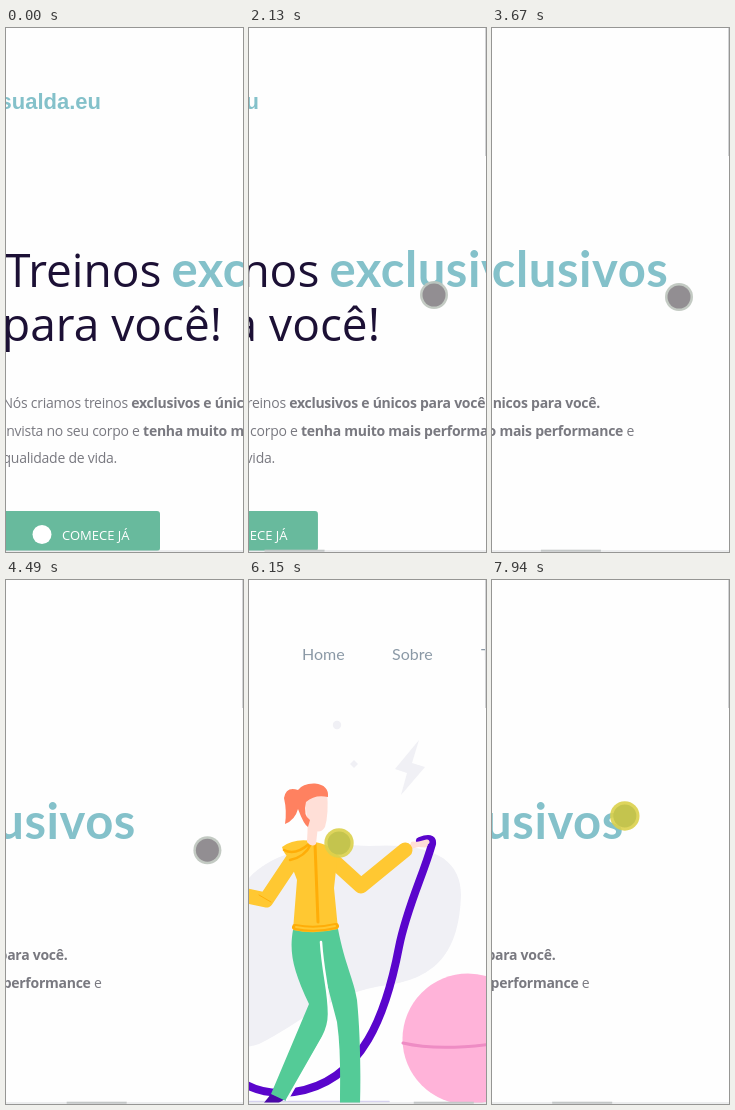
An HTML page with a canvas that plays this animation: 237x524 px, repeating every 8000 ms.

```html
<!DOCTYPE html>
<html lang="pt">
<head>
<meta charset="utf-8">
<title>Treinos</title>
<style>
html, body { margin: 0; width: 100%; height: 100%; overflow: hidden; background: #fefefe; }
canvas { display: block; width: 237px; height: 524px; }
</style>
</head>
<body>
<canvas id="stage"></canvas>
<script>
const W = 237, H = 524, LOOP = 8000, ART_X = 675;
const canvas = document.getElementById('stage');
const ctx = canvas.getContext('2d');
const dpr = window.devicePixelRatio || 1;
canvas.width = Math.round(W * dpr);
canvas.height = Math.round(H * dpr);

// [time, scroll]
const SCROLL = [[0, 0], [1160, 0], [2130, 85], [2800, 130], [3600, 217], [4240, 217],
  [4850, 330], [5450, 468], [5850, 600], [6150, 675], [6300, 675], [7050, 567],
  [7500, 490], [7940, 262], [8000, 240]];
// [time, x, y]
const POINTER = [[1160, 255, 285], [1450, 185, 267], [2130, 185, 267], [3670, 187, 269],
  [4240, 187, 269], [4850, 222, 272], [5450, 195, 271], [5900, 98, 264], [6150, 90, 263],
  [6300, 92, 263], [7050, 249, 262], [7350, 268, 255], [7600, 210, 246], [7940, 133, 236], [8000, 122, 234]];

function at(keys, t, col = 1) {
  let i = 1;
  while (i < keys.length - 1 && keys[i][0] < t) i++;
  const a = keys[i - 1], b = keys[i];
  const k = Math.min(1, Math.max(0, (t - a[0]) / (b[0] - a[0])));
  return a[col] + (b[col] - a[col]) * k;
}

function fill(d, color) {
  ctx.fillStyle = color;
  ctx.fill(new Path2D(d));
}

function line(d, color, width) {
  ctx.strokeStyle = color;
  ctx.lineWidth = width;
  ctx.lineCap = ctx.lineJoin = 'round';
  ctx.stroke(new Path2D(d));
}

function disc(x, y, r, color) {
  ctx.fillStyle = color;
  ctx.beginPath();
  ctx.arc(x, y, r, 0, Math.PI * 2);
  ctx.fill();
}

function text(str, x, y, font, color, spacing = 0, align = 'left') {
  ctx.font = font;
  ctx.letterSpacing = spacing + 'px';
  ctx.fillStyle = color;
  ctx.textAlign = align;
  ctx.fillText(str, x, y);
  return x + ctx.measureText(str).width;
}

const lato = (weight, size) => `${weight} ${size}px Lato, sans-serif`;
const open = (weight, size) => `${weight} ${size}px "Open Sans", sans-serif`;

function drawCopy() {
  const dark = '#1c1035', teal = '#84c1ca', gray = '#797980';
  text('sualda.eu', 95, 81, 'bold 22px "Liberation Sans", Arial, sans-serif', teal, 0, 'right');

  const title = open(400, 46);
  text('Treinos', -1, 259, title, dark);
  text('exclusivos', 165.5, 259, lato(700, 49), teal, 0.55);
  text('para você!', -4, 313, title, dark);

  const body = open(400, 14), strong = open(700, 14), tight = -0.26;
  let x = text('Nós criamos treinos ', -3.5, 380, body, gray, tight);
  text('exclusivos e únicos para você.', x, 380, strong, gray, tight);
  x = text('Invista no seu corpo e ', -3.5, 408, body, gray, tight);
  x = text('tenha muito mais performance', x, 408, strong, gray, tight);
  text(' e', x, 408, body, gray, tight);
  text('qualidade de vida.', -3.5, 435, body, gray, tight);

  ctx.fillStyle = '#68ba9d';
  ctx.beginPath();
  ctx.roundRect(-6, 483, 160, 40, 3);
  ctx.fill();
  disc(36, 506.5, 9.5, '#fff');
  text('COMECE JÁ', 56, 512, open(400, 13), '#fff');
}

function drawMenu() {
  const items = [['Home', 728], ['Sobre', 818], ['Treinos', 907]];
  for (const [label, x] of items) text(label, x, 80, lato(400, 16), '#8b99a6');
}

function drawBackdrop() {
  const pale = '#f0f0f5';
  fill('M-119 370C-117 345-92 338-72 350C-45 362-28 345-10 312C10 275 60 262 120 266C185 262 212 280 212 315C210 380 180 398 140 405C80 412 50 445 10 464C-20 474-60 460-85 430C-105 412-120 390-119 370Z', pale);
  fill('M-72 196L-58 222L-41 218L-39 268L-51 240L-70 246Z', pale);
  fill('M170 160L146 189L158 193L152 215L176 187L163 183Z', pale);
  fill('M-124 253L-116 252L-115 261L-124 262Z', pale);
  fill('M105 180L109 184L105 188L101 184Z', pale);
  disc(-31, 171, 4.5, pale);
  disc(88, 145, 4.2, pale);
}

function drawGear() {
  line('M-113 521.5H140', '#d6d2ee', 1.5);
  disc(219, 459, 65.5, '#ffb3d9');
  line('M154 463Q200 474 284 457', '#ee8cc4', 3);
  line('M-96 490C-100 464-62 464-66 490', '#5a05cc', 7);
  fill('M-104 503C-104 488-94 480-81 480C-67 480-57 488-57 503C-57 513-63 522-70 522H-92C-99 522-104 513-104 503Z', '#8f32ff');
}

function drawWoman() {
  const skin = '#ffdfd7', hair = '#ff8160', coat = '#ffc832', trim = '#ffad08', pants = '#54cb97';

  // rope and hands
  line('M-46 309Q-62 307-60 319C-52 390-47 450-23 487C-5 511 20 515 45 512C115 502 138 430 150 367C158 327 174 296 183 264Q184 256 171 261', '#5a05cc', 8);
  line('M-47 313L-35 309M-45 309L-34 308M163 266L178 262M164 264L176 265', skin, 5);

  // legs
  fill('M22 514L36 519L28 524H14Z', '#4a08a8');
  fill('M44 350C40 372 44 390 60 424L22 514L37 521L77 450C82 435 81 420 77 400L88 442C92 470 91 500 91 524H111C112 490 111 450 108 420C105 400 96 385 89 349Z', pants);
  line('M72 362C74 394 80 410 80 434Q80 446 74 457L38 520', '#fff', 2.5);

  // sleeves, then body
  line('M47 275L17 320L-25 311', coat, 15);
  line('M78 275L112 306L156 270', coat, 15);
  line('M10 315L22 322', trim, 1);
  fill('M46 265Q66 258 82 268Q90 273 87 290L85 308L89 349Q66 355 44 350L48 300L39 276Z', coat);
  fill('M33 267Q45 258 63 261L57 280Q38 284 33 267Z', coat);
  line('M35 270Q46 276 60 264M41 280Q56 277 62 264', trim, 2.5);
  line('M66 264L69 342', trim, 3);
  line('M46 347Q66 351 87 346', trim, 6);
  line('M47 347Q66 351 86 346', coat, 2);

  // head
  fill('M59 240L69 246L67 264Q63 268 58 262Z', skin);
  fill('M57 216L78 212Q80 233 76 247Q71 255 63 249Q56 243 57 216Z', skin);
  fill('M79 217Q80 205 66 203.5Q54 203 49 210Q37 206 35 218Q38 231 36 244Q46 240 49 229Q55 245 59 247L61 240Q54 236 57 222Q66 214 79 217Z', hair);
}

function drawBars(scroll, t) {
  ctx.fillStyle = '#dcdddf';
  ctx.fillRect(0, 522.5, W, 1);
  if (t < 1160) return;
  ctx.fillStyle = '#c3c7c7';
  ctx.fillRect(scroll * 0.253 - 6, 521.7, 60, 2);
  ctx.fillStyle = '#d3d4d6';
  ctx.fillRect(236, 0, 1, 128);
}

function drawPointer(t) {
  if (t < 1160) return;
  const x = at(POINTER, t), y = at(POINTER, t, 2), pressed = t >= 4850;
  disc(x, y, pressed ? 14.7 : 14, pressed ? 'rgba(218,208,75,.9)' : 'rgba(190,197,190,.92)');
  disc(x, y, 11.5, pressed ? '#c4c44e' : '#928e92');
}

function render(t) {
  const scroll = at(SCROLL, t);
  ctx.setTransform(dpr, 0, 0, dpr, 0, 0);
  ctx.fillStyle = '#fefefe';
  ctx.fillRect(0, 0, W, H);

  ctx.save();
  ctx.beginPath();
  ctx.rect(0, 0, W, 523);
  ctx.clip();
  ctx.translate(-scroll, 0);
  drawCopy();
  drawMenu();
  ctx.translate(ART_X, 0);
  drawBackdrop();
  drawGear();
  drawWoman();
  ctx.restore();

  drawBars(scroll, t);
  drawPointer(t);
}

const start = performance.now();
function tick() {
  render((performance.now() - start) % LOOP);
  requestAnimationFrame(tick);
}
tick();
</script>
</body>
</html>
```
